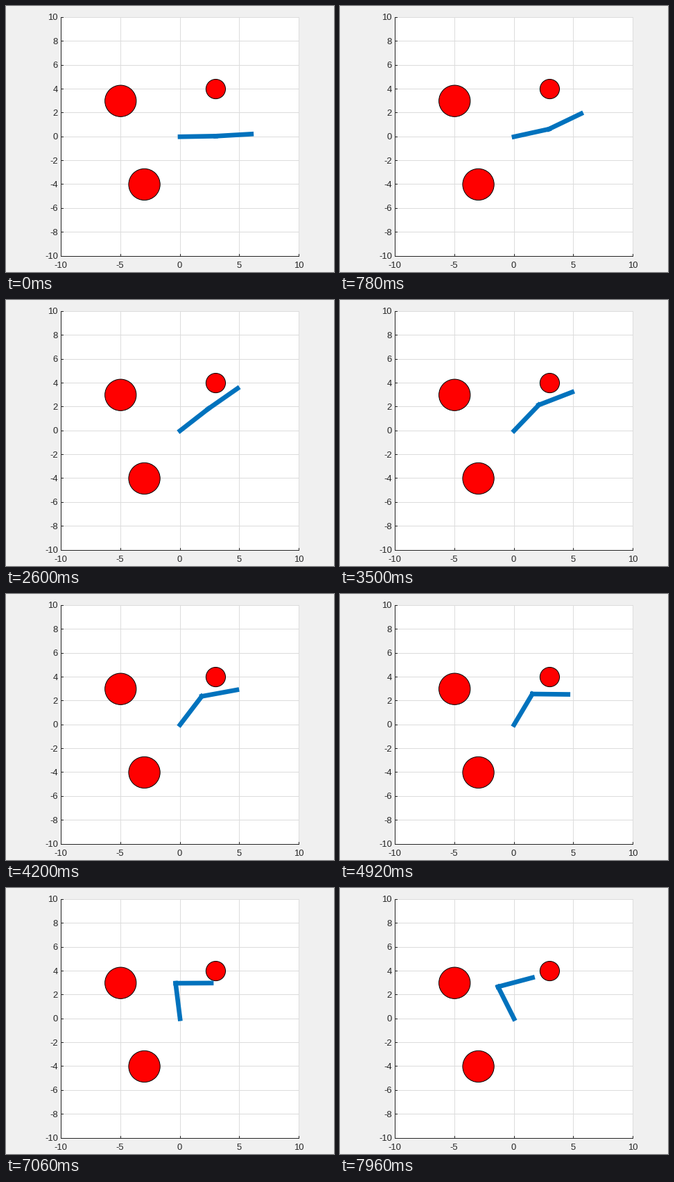
These frames come from a looping animation (473 by 383 pixels, 8000 ms). A matplotlib script:

```python
import numpy as np
import matplotlib.pyplot as plt
from matplotlib.animation import FuncAnimation
from matplotlib.collections import LineCollection
from matplotlib.patches import Circle

WIDTH, HEIGHT, DPI = 473, 383, 64
PX = 72 / DPI  # points per pixel
LOOP_MS, STEP_MS = 8000, 20

LEFT, RIGHT, TOP, BOTTOM = 79.5, 422.5, 16.5, 360
UNIT = (RIGHT - LEFT) / 20
INK, GRID, BLUE = "#262626", "#dcdcdc", "#0072bd"

LINK = 3
START = 0.34
OBSTACLES = [(-5, 3, 1.32), (-3, -4, 1.32), (3, 4, 0.82)]

# The arm moves at an even pace between these joint angles (degrees).
TIMES = [0.30, 1.38, 5.60, 7.76, 7.96]
SHOULDER = [1, 26.5, 65.5, 112.3, 116.7]
ELBOW = [2.3, 26.9, -76.5, -106.6, -101.9]


def to_px(x, y):
    return (LEFT + (x + 10) * UNIT,
            BOTTOM - (y + 10) * (BOTTOM - TOP) / 20)


def segments(lines, color, zorder):
    ax.add_collection(LineCollection(lines, colors=color, linewidths=PX,
                                     capstyle="projecting", zorder=zorder))


def label(x, y, value, align):
    ax.text(x, y, str(value), ha=align, va="baseline", color=INK,
            family="Liberation Sans", fontsize=13 * PX)


def draw_axes():
    # Whole-pixel ends let the renderer snap each line to one pixel.
    left, right, top, bottom = np.floor([LEFT, RIGHT, TOP, BOTTOM])
    ax.fill([left, right, right, left], [top, top, bottom, bottom],
            color="white", linewidth=0, zorder=0)
    grid = []
    marks = [[(left, top), (left, bottom)], [(left, bottom), (right, bottom)]]
    for value in range(-10, 11, 5):
        exact = to_px(value, 0)[0]
        x = np.floor(exact)
        grid.append([(x, top), (x, bottom)])
        marks.append([(x, bottom), (x, bottom - 3)])
        label(exact - 0.7, 377, value, "center")
    for value in range(-10, 11, 2):
        exact = to_px(0, value)[1]
        y = np.floor(exact)
        grid.append([(left, y), (right, y)])
        marks.append([(left, y), (left + 3, y)])
        label(75, exact + 4, value, "right")
    segments(grid, GRID, 1)
    segments(marks, INK, 2)


fig = plt.figure(figsize=(WIDTH / DPI, HEIGHT / DPI), dpi=DPI,
                 facecolor="#f0f0f0")
ax = fig.add_axes([0, 0, 1, 1])
ax.set_xlim(0, WIDTH)
ax.set_ylim(HEIGHT, 0)
ax.axis("off")
draw_axes()

for cx, cy, radius in OBSTACLES:
    ax.add_patch(Circle(to_px(cx, cy), radius * UNIT, facecolor="red",
                        edgecolor="black", linewidth=PX, zorder=3))

links = [ax.plot([], [], color=BLUE, linewidth=6.67 * PX,
                 solid_capstyle="projecting", zorder=4)[0] for _ in range(2)]


def update(frame):
    seconds = frame * STEP_MS / 1000
    if seconds < START:
        seconds = 0
    shoulder, elbow = (np.radians(np.interp(seconds, TIMES, angles))
                       for angles in (SHOULDER, ELBOW))
    x = y = 0
    for link, angle in zip(links, (shoulder, shoulder + elbow)):
        start = to_px(x, y)
        x += LINK * np.cos(angle)
        y += LINK * np.sin(angle)
        link.set_data(*zip(start, to_px(x, y)))
    return links


anim = FuncAnimation(fig, update, frames=LOOP_MS // STEP_MS,
                     interval=STEP_MS, repeat=True, repeat_delay=0)
plt.show()
```
